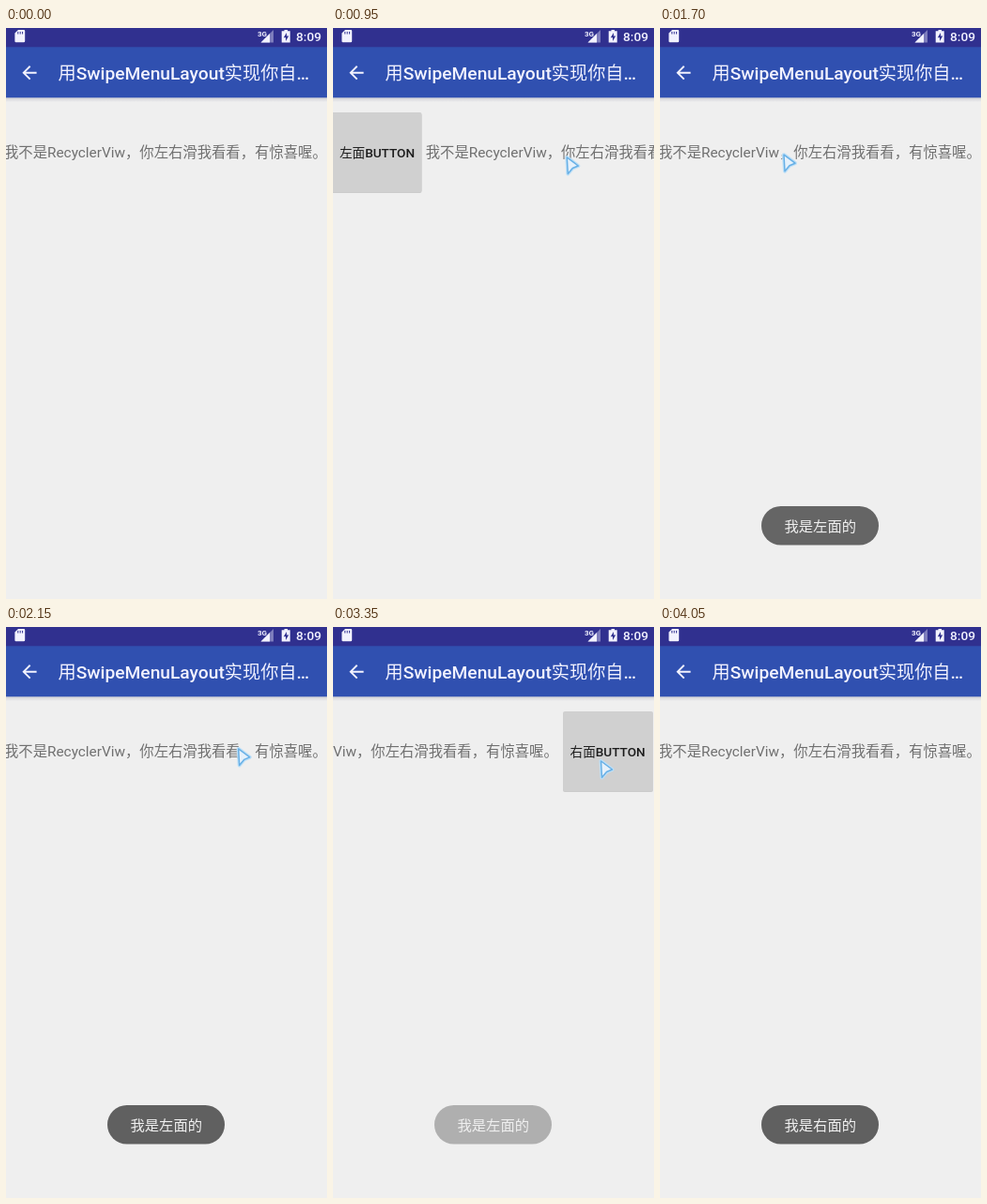
These frames come from a looping animation (342 by 609 pixels, 4.15 s). An HTML page:

```html
<!DOCTYPE html>
<html lang="zh-CN">
<head>
<meta charset="utf-8">
<title>Swipe menu</title>
<style>
  html, body { margin: 0; width: 100%; height: 100%; overflow: hidden; background: #efefef; }
  svg { display: block; width: 342px; height: 609px; }
  text { font-family: Roboto, "Noto Sans CJK SC", "Noto Sans CJK", sans-serif; white-space: pre; }
  .medium { font-weight: 500; }
  .label { font-size: 13.6px; font-weight: 500; fill: #1c1c1c; }
</style>
</head>
<body>
<svg viewBox="0 0 342 609" lang="zh-CN">
  <defs>
    <linearGradient id="shade" x2="0" y2="1">
      <stop offset="0" stop-color="#cfcfd4"/>
      <stop offset="1" stop-color="#efefef"/>
    </linearGradient>
    <g id="button">
      <rect y="1" width="96" height="85" rx="2" fill="#bcbcbc" opacity=".7"/>
      <rect width="96" height="85" rx="2" fill="#d0d0d0"/>
    </g>
    <path id="arrow" d="M2.5 3L14.500 12 8.500 14.500 3.500 20.500z" stroke-linejoin="round"/>
  </defs>
  <rect width="342" height="609" fill="#efefef"/>

  <rect id="press" y="83.5" width="342" height="95.5" fill="#dfdfdf"/>
  <g id="row">
    <use href="#button" x="-102.2" y="90"/>
    <text class="label" x="-93.8" y="137.6">左面BUTTON</text>
    <text x="-2" y="138" font-size="15.35" fill="#707070">我不是RecyclerViw，你左右滑我看看，有惊喜喔。</text>
    <use href="#button" x="347" y="90"/>
    <text class="label" x="354.6" y="137.6">右面BUTTON</text>
  </g>

  <rect y="74" width="342" height="5" fill="url(#shade)"/>
  <rect y="20" width="342" height="54.3" fill="#3050b0"/>
  <rect width="342" height="20.3" fill="#30308f"/>
  <path transform="translate(13.6 36.3) scale(.95)" fill="#f2f2ff"
    d="M20 11H7.83l5.59-5.59L12 4l-8 8 8 8 1.41-1.41L7.83 13H20z"/>
  <text class="medium" x="55.5" y="55" font-size="19.2" fill="#f2f2ff">用SwipeMenuLayout实现你自…</text>

  <g fill="#f2f2ff" transform="translate(0 -.6)">
    <path d="M13 2.5h6a1.2 1.2 0 0 1 1.2 1.2v11a1.2 1.2 0 0 1-1.2 1.2h-8.4a1.2 1.2 0 0 1-1.2-1.2V6z"/>
    <path d="M12.8 4.500v2.600M15.200 4.500v2.600M17.600 4.500v2.600" stroke="#30308f"/>
    <path d="M271.500 16H285V2.500z" opacity=".4"/>
    <path d="M271.500 16h9.500V6.500z"/>
    <text x="268" y="9.200" font-size="8" font-weight="700">3G</text>
    <path d="M296.500 2.500h3.500v1.300h2.700v12.400h-9V3.800h2.800z"/>
    <path d="M299 5.500l-3.200 5.300h2.200v3.700l3.200-5.300H299z" fill="#30308f"/>
    <text class="medium" x="309" y="14.800" font-size="13.700">8:09</text>
  </g>

  <g id="toast">
    <rect x="108" y="510" width="125" height="41.500" rx="20.750" fill="#606060"/>
    <text id="message" x="132.500" y="536.500" font-size="15.300" fill="#f0f0f0"></text>
  </g>

  <g id="cursor">
    <use href="#arrow" fill="none" stroke="#bcdff7" stroke-width="4"/>
    <use href="#arrow" fill="#e6f1fb" stroke="#68b0e6" stroke-width="1.500"/>
  </g>
</svg>
<script>
  const LOOP = 4150, STEP = 50, OPEN = 102;

  const smooth = p => p * p * (3 - 2 * p);
  const easeIn = p => p * p;
  const easeOut = p => 1 - (1 - p) ** 2;
  const flick = p => 1 - (1 - p) ** 4;

  // A move is [begin, end, goal, easing]
  const travelX = [
    [50, 450, 97, smooth], [550, 1050, 247, flick], [1100, 1400, 64, smooth],
    [1500, 2000, 250, smooth], [2100, 2600, 77, smooth],
    [2600, 2800, 297, smooth], [2900, 3150, 283, smooth]
  ];
  const travelY = [
    [50, 450, 135, smooth], [1500, 2000, 127, smooth], [2100, 2600, 124, smooth],
    [2600, 2800, 172, smooth], [2900, 3150, 140, smooth]
  ];
  // Both closings stall briefly while the toast opens
  const slide = [
    [550, 1000, OPEN, easeOut], [1300, 1400, 47, easeIn], [1500, 1700, 0, easeOut],
    [2150, 2500, -OPEN, smooth], [3450, 3500, -60, easeIn], [3650, 3850, 0, easeOut]
  ];
  const fade = [
    [1500, 1750, 1, easeOut], [3050, 3450, 0, easeIn], [3650, 3900, 1, easeOut]
  ];
  const press = [[2200, 2350, 1, smooth], [2550, 2650, 0, smooth]];

  const el = id => document.getElementById(id);
  const set = (id, name, value) => el(id).setAttribute(name, value);

  function follow(moves, t, value = 0) {
    for (const [begin, end, goal, ease] of moves) {
      if (t <= begin) break;
      value += (goal - value) * ease(Math.min(1, (t - begin) / (end - begin)));
    }
    return value;
  }

  function draw() {
    const t = Math.floor(performance.now() % LOOP / STEP) * STEP;
    const x = follow(travelX, t, 316), y = follow(travelY, t, 224);
    set("cursor", "transform", `translate(${x} ${y})`);
    set("cursor", "opacity", t >= 50 && t < 4050 ? 1 : 0);
    set("row", "transform", `translate(${follow(slide, t)} 0)`);
    set("toast", "opacity", follow(fade, t));
    set("press", "opacity", follow(press, t));
    el("message").textContent = t < 3500 ? "我是左面的" : "我是右面的";
    requestAnimationFrame(draw);
  }
  draw();
</script>
</body>
</html>
```
